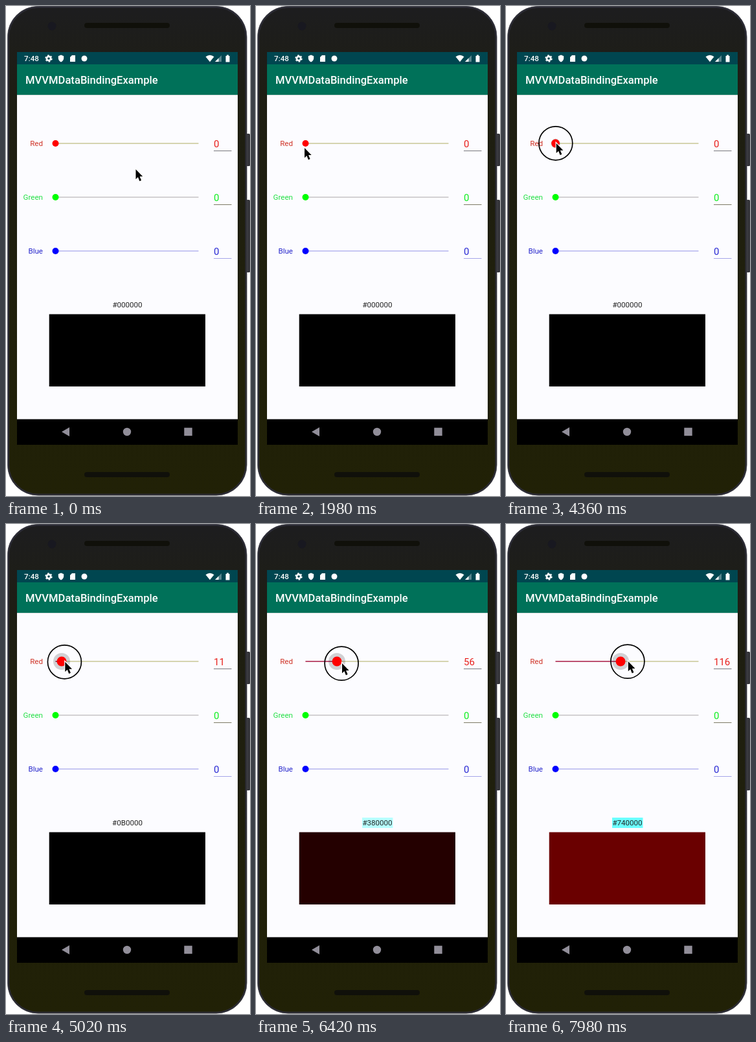
Animation of 377 by 756 pixels, one loop 8 s. Source, as an HTML page:

```html
<!DOCTYPE html>
<html lang="en">
<head>
<meta charset="utf-8">
<title>MVVMDataBindingExample</title>
<style>
html, body { margin: 0; width: 100%; height: 100%; overflow: hidden; background: #fff; }
svg { display: block; width: 100%; height: 100%; font-family: Roboto, sans-serif; }
.label { font-size: 11.6px; }
.value { font-size: 15px; }
</style>
</head>
<body>
<svg viewBox="0 0 377 756">
  <defs>
    <linearGradient id="body" x2="0" y2="1">
      <stop stop-color="#1d1d1f"/>
      <stop offset=".2" stop-color="#1e1e12"/>
      <stop offset="1" stop-color="#212106"/>
    </linearGradient>
  </defs>

  <!-- Phone body -->
  <g fill="#35353a">
    <rect x="370" y="197" width="7" height="50" rx="1.5"/>
    <rect x="370" y="299" width="7" height="112" rx="1.5"/>
  </g>
  <rect x="2.5" y="0.5" width="369.5" height="754.5" rx="47" fill="url(#body)" stroke="#4c4c54"/>
  <rect x="4" y="2" width="366.5" height="751.5" rx="45.5" fill="none" stroke="#2b2b35" stroke-width="2"/>
  <g fill="none" stroke="#10100a" stroke-width="8" stroke-linecap="round">
    <path d="M125 30H249M125 723H249"/>
  </g>
  <circle cx="71" cy="31" r="6.5" fill="#181820"/>

  <!-- Screen -->
  <rect x="17" y="71" width="341" height="606" fill="#fcfcff"/>
  <rect x="17" y="71" width="341" height="20" fill="#004650"/>
  <rect x="17" y="90" width="341" height="47" fill="#007159"/>
  <rect x="17" y="137" width="341" height="1" fill="#d4dad8"/>
  <rect x="17" y="637.5" width="341" height="39.5" fill="#000"/>

  <g fill="#fff">
    <text x="28" y="85" font-size="11.6" font-weight="500">7:48</text>
    <circle cx="66" cy="81" r="3.1" fill="none" stroke="#fff" stroke-width="2.6"/>
    <circle cx="66" cy="81" r="4.9" fill="none" stroke="#fff" stroke-width="1.5" stroke-dasharray="2.6 2.53"/>
    <path d="M85 75.5l4.2 1.7v3.4c0 2.8-1.8 4.9-4.2 5.8c-2.4-.9-4.2-3-4.2-5.8v-3.4z"/>
    <path d="M102 76h5v10h-8v-7z"/>
    <circle cx="121" cy="81" r="4.5"/>
    <path d="M308.5 78.2q6.5-5 13 0l-6.5 8z"/>
    <path d="M333 76v10h-10z" opacity=".35"/>
    <path d="M328.5 80.5v5.5h-5.5z"/>
    <path d="M339.5 77h1.5v-1.5h3v1.5h1.5v9.5h-6z"/>
    <text x="30" y="120" font-size="16.6" font-weight="500">MVVMDataBindingExample</text>
  </g>

  <g id="sliders"></g>

  <rect id="highlight" x="164" y="453" width="47.5" height="16"/>
  <text id="hex" class="label" x="187.5" y="465" text-anchor="middle" fill="#222"></text>
  <rect id="swatch" x="66.7" y="475.5" width="241.3" height="111.5"/>

  <g fill="#918e99">
    <path d="M86 657l12-7v14z"/>
    <circle cx="187" cy="657" r="6.2"/>
    <rect x="275.3" y="650.7" width="12.4" height="12.4"/>
  </g>

  <circle id="ring" r="26" fill="none" stroke="#000" stroke-width="1.7"/>
  <path id="cursor" d="M0 0V15.2L3.4 12.1L5.9 18.2L8.6 17L6.1 11.1H10.7Z"
        fill="#000" stroke="#fff" stroke-width="2.4" paint-order="stroke"/>
</svg>
<script>
const LOOP = 8000, PRESS = 3540, DRAG = 4250;
const TRACK_START = 76.5, TRACK_LENGTH = 221;
const $ = id => document.getElementById(id);

const rows = [
  { name: 'Red', y: 212, label: '#cf3428', color: '#f00', text: '#e8201c', track: '#c9c795', line: '#77777c' },
  { name: 'Green', y: 295, label: '#22e044', color: '#0f0', text: '#10ee20', track: '#c6c3c4', line: '#7d7a64' },
  { name: 'Blue', y: 378, label: '#2626cc', color: '#00f', text: '#2a2ad4', track: '#b5b5ee', line: '#a5a5ea' }
];

$('sliders').innerHTML = rows.map(r => `
  <text class="label" x="57" y="${r.y + 4}" text-anchor="end" fill="${r.label}">${r.name}</text>
  <path d="M${TRACK_START} ${r.y}h${TRACK_LENGTH}" stroke="${r.track}" stroke-width="1.5"/>
  <path id="progress${r.name}" stroke="#b5245c" stroke-width="1.7"/>
  <circle id="halo${r.name}" cy="${r.y}" fill="#000" fill-opacity=".17"/>
  <circle id="thumb${r.name}" cx="${TRACK_START}" cy="${r.y}" r="5" fill="${r.color}"/>
  <text id="value${r.name}" class="value" x="321" y="${r.y + 5.5}" fill="${r.text}">0</text>
  <path d="M321 ${r.y + 11.5}h27.5" stroke="${r.line}"/>`).join('');

// Time, pointer x, pointer y, red value
const keys = [
  [0, 200.5, 252, 0], [300, 200.5, 252, 0], [1800, 75, 219, 0], [2500, 75, 219, 0],
  [3400, 77.2, 211.7, 0], [DRAG, 77.2, 211.7, 0], [5020, 91.3, 212.7, 11],
  [6420, 133, 215, 56], [7260, 159.2, 214, 85], [7980, 188.8, 212, 116]
];

function slope(i, col) {
  const rate = k => (keys[k + 1][col] - keys[k][col]) / (keys[k + 1][0] - keys[k][0]);
  if (i === 0) return 0;
  if (i === keys.length - 1) return rate(i - 1);
  const a = rate(i - 1), b = rate(i);
  return a * b <= 0 ? 0 : 2 * a * b / (a + b);
}

// Monotone cubic interpolation
function sample(col, t) {
  t = Math.min(t, keys.at(-1)[0]);
  const i = Math.max(0, keys.findIndex(k => k[0] >= t) - 1);
  const p = keys[i], q = keys[i + 1], span = q[0] - p[0], u = (t - p[0]) / span;
  const ease = u * u * (3 - 2 * u);
  return p[col] * (1 - ease) + q[col] * ease
    + span * u * (1 - u) * ((1 - u) * slope(i, col) - u * slope(i + 1, col));
}

function set(id, attrs) {
  for (const [key, value] of Object.entries(attrs)) $(id).setAttribute(key, value);
}

function draw(t) {
  const x = sample(1, t), y = sample(2, t), red = Math.round(sample(3, t));
  const thumbX = TRACK_START + TRACK_LENGTH * red / 255;
  const grow = Math.min(1, Math.max(0, (t - DRAG) / 200));

  set('cursor', { transform: `translate(${x} ${y})` });
  set('ring', { cx: x - 0.9, cy: y + 0.1, visibility: t >= PRESS ? 'visible' : 'hidden' });
  set('thumbRed', { cx: thumbX, r: 5 + 2.5 * grow });
  set('haloRed', { cx: thumbX, r: 13 * grow });
  set('progressRed', { d: `M${TRACK_START} 212H${thumbX}` });
  $('valueRed').textContent = red;
  $('hex').textContent = '#' + red.toString(16).toUpperCase().padStart(2, '0') + '0000';
  set('highlight', {
    fill: `rgb(${255 - 1.28 * red},255,255)`,
    visibility: red > 16 ? 'visible' : 'hidden'
  });
  set('swatch', { fill: `rgb(${Math.max(0, 1.17 * red - 30)},0,0)` });
}

const start = performance.now();
function frame() {
  draw((performance.now() - start) % LOOP);
  requestAnimationFrame(frame);
}
frame();
</script>
</body>
</html>
```
